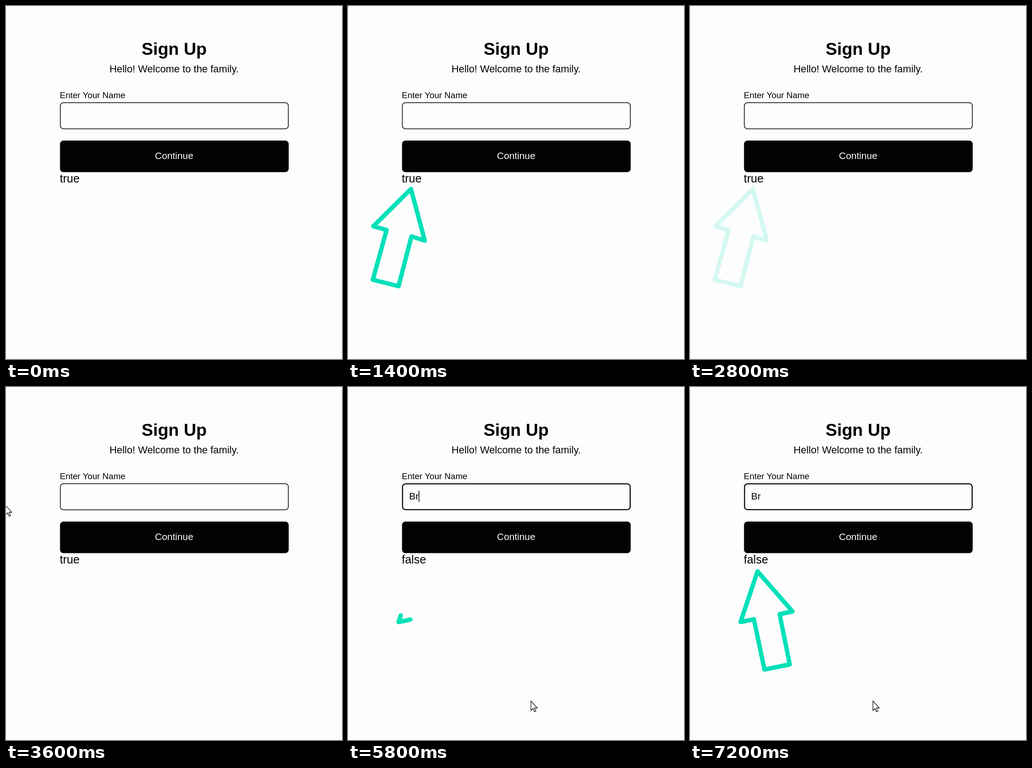
Write an HTML page that moves like this. It is 731 px wide and 766 px high and loops after 7400 ms.

```html
<!DOCTYPE html>
<html lang="en">
<head>
<meta charset="utf-8">
<title>Sign Up</title>
<style>
  html, body { margin: 0; width: 100%; height: 100%; overflow: hidden; background: #fdfdfd; }
  svg { display: block; width: 100%; height: 100%; }
  text { font-family: "Liberation Sans", Arial, sans-serif; fill: #020204; }
  .mid { text-anchor: middle; }
  .arrow { fill: none; stroke: #00e0b8; stroke-width: 9.5; stroke-linecap: round; stroke-linejoin: round; }
</style>
</head>
<body>
<svg viewBox="0 0 731 766" xmlns="http://www.w3.org/2000/svg">
  <rect width="731" height="766" fill="#fdfdfd"/>
  <rect id="speck" width="1" height="1"/>
  <text class="mid" x="365.8" y="106" font-size="37.5" font-weight="bold">Sign Up</text>
  <text class="mid" x="365.8" y="144" font-size="21.875">Hello! Welcome to the family.</text>
  <text x="117" y="200" font-size="18.75">Enter Your Name</text>
  <rect id="field" fill="#fdfdfd" stroke="#020204"/>
  <text id="typed" x="133" y="244" font-size="20.83"></text>
  <rect id="caret" y="225" width="1.6" height="24" fill="#020204"/>
  <rect x="117.5" y="292" width="497.5" height="68.5" rx="7.5" fill="#020204"/>
  <text class="mid" x="365.8" y="332" font-size="20.83" style="fill:#fdfdfd">Continue</text>
  <text id="status" x="117" y="383" font-size="25"></text>
  <path id="arrowA" class="arrow" pathLength="1" d="M138 500L167 509L137 397L55 478L84 486L54 594L110 608L138 500"/>
  <path id="arrowB" class="arrow" pathLength="1" d="M195 493L223 487L147 400L110 510L139 504L162 613L217 602L195 493"/>
  <path id="cursor" d="M0 0V20.5L4.7 16.2L7.7 23.3L10.7 22L7.7 15H13.8Z" fill="#fff" stroke="#111" stroke-width="1.3"/>
</svg>
<script>
const LOOP = 7400, STEP = 200, BLINK = 500;
const FOCUS = 4050, KEY_1 = 5350, KEY_2 = 5650;
const mouse = [
  [3600, -1, 257], [3800, 150, 245], [4000, 265, 236],
  [4200, 278, 240], [4400, 375, 520], [4600, 398, 681.5]
];

const el = id => document.getElementById(id);
const clamp = x => Math.max(0, Math.min(1, x));
const show = (node, on) => node.setAttribute("visibility", on ? "visible" : "hidden");
const set = (node, attrs) => {
  for (const key in attrs) node.setAttribute(key, attrs[key]);
};

// The stroke grows from its middle; the tail end sets off a little later.
function drawArrow(node, t, start, span, opacity = 1) {
  const from = 0.5 - 0.5 * clamp((t - start) / 400);
  const to = 0.5 + 0.5 * clamp((t - start - 50) / span);
  show(node, t > start && opacity > 0.01);
  set(node, { "stroke-dasharray": `${to - from} 2`, "stroke-dashoffset": -from, opacity });
}

function fade(t, start, span) {
  return (1 + Math.cos(Math.PI * clamp((t - start) / span))) / 2;
}

function moveCursor(t) {
  const next = mouse.findIndex(p => p[0] > t);
  const b = next < 0 ? mouse[mouse.length - 1] : mouse[next];
  const a = next < 0 ? b : mouse[Math.max(0, next - 1)];
  const k = a === b ? 0 : (t - a[0]) / (b[0] - a[0]);
  const at = i => a[i] + (b[i] - a[i]) * k;
  show(el("cursor"), t >= mouse[0][0]);
  set(el("cursor"), { transform: `translate(${at(1)} ${at(2)})` });
}

function drawForm(t) {
  const focused = t >= FOCUS;
  const w = focused ? 2.3 : 1.5;
  set(el("field"), {
    x: 117.5 + w / 2, y: 209 + w / 2, width: 497.5 - w, height: 58.2 - w,
    rx: 7.5 - w / 2, "stroke-width": w
  });

  const text = t < KEY_1 ? "" : t < KEY_2 ? "B" : "Br";
  el("typed").textContent = text;
  el("status").textContent = text ? "false" : "true";

  // Focus and every key restart the blink.
  const since = t - (t < KEY_1 ? FOCUS : t < KEY_2 ? KEY_1 : KEY_2);
  show(el("caret"), focused && since % (2 * BLINK) < BLINK);
  set(el("caret"), { x: [133.5, 147, 153.6][text.length] });
}

function render(t) {
  show(el("speck"), t >= 1400 && t < 3800);
  drawForm(t);
  drawArrow(el("arrowA"), t, 190, 625, fade(t, 2270, 714));
  drawArrow(el("arrowB"), t, 5745, 600);
  moveCursor(t);
}

const origin = performance.now();
function tick() {
  const t = (performance.now() - origin) % LOOP;
  render(Math.floor(t / STEP) * STEP);
  requestAnimationFrame(tick);
}
tick();
</script>
</body>
</html>
```
